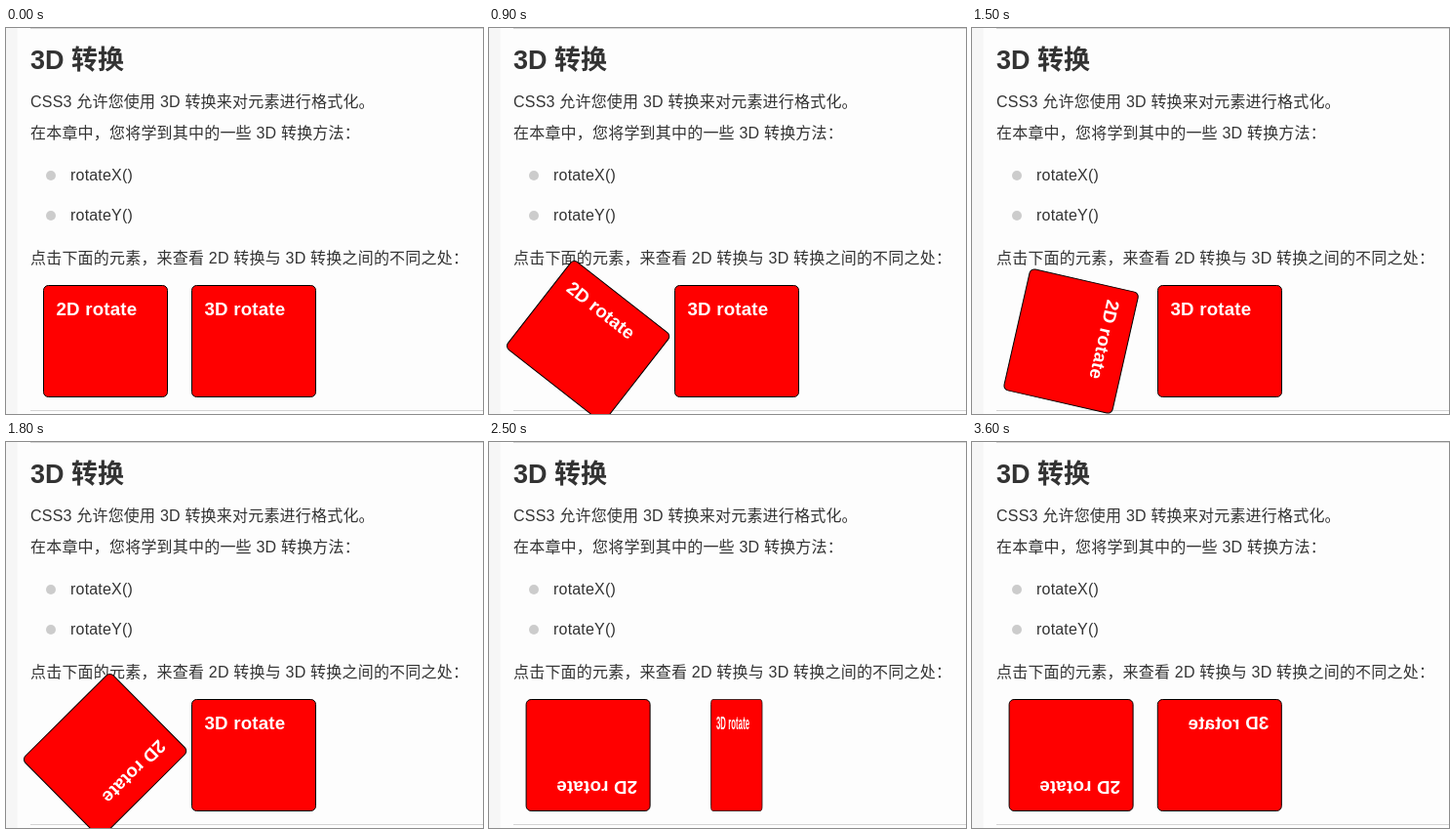
These frames come from a looping animation (489 by 395 pixels, 4.5 s). An HTML page:

```html
<!DOCTYPE html>
<html lang="zh-CN">
<head>
<meta charset="utf-8">
<title>3D 转换</title>
<style>
  html, body { margin: 0; width: 100%; height: 100%; overflow: hidden; background: #fdfdfd; }
  svg { display: block; }
  text {
    font: 16px "Liberation Sans", Arial, "Noto Sans CJK SC", "Noto Sans CJK", sans-serif;
    letter-spacing: .2px;
    fill: #333;
  }
  .title { font-size: 27px; font-weight: bold; letter-spacing: 0; }
  .box rect { fill: #f00; stroke: #000; }
  .box text { font-size: 18.72px; font-weight: bold; fill: #fff; }
</style>
</head>
<body>
<svg width="489" height="395" viewBox="0 0 489 395">
  <rect width="489" height="395" fill="#fdfdfd"/>
  <rect width="11.5" height="395" fill="#f6f6f6"/>
  <path d="M25 .5H489M25 391.5H489" stroke="#d4d4d4"/>
  <text class="title" x="25" y="42">3D 转换</text>
  <text x="25" y="81">CSS3 允许您使用 3D 转换来对元素进行格式化。</text>
  <text x="25" y="113">在本章中，您将学到其中的一些 3D 转换方法：</text>
  <g fill="#ccc"><circle cx="46" cy="151" r="5"/><circle cx="46" cy="192" r="5"/></g>
  <text x="66" y="156">rotateX()</text>
  <text x="66" y="197">rotateY()</text>
  <text x="25" y="241">点击下面的元素，来查看 2D 转换与 3D 转换之间的不同之处：</text>
  <!-- Boxes are drawn around their own centre -->
  <g class="box" id="flat">
    <rect x="-63.5" y="-57" width="127" height="114" rx="5"/>
    <text x="-50.5" y="-26.5">2D rotate</text>
  </g>
  <g class="box" id="deep">
    <rect x="-63.5" y="-57" width="127" height="114" rx="5"/>
    <text x="-50.5" y="-26.5">3D rotate</text>
  </g>
</svg>
<script>
  const LOOP = 4500, STEP = 100, CY = 320.5;
  const flat = document.getElementById('flat');
  const deep = document.getElementById('deep');

  // Degrees turned at time t: constant speed, stopping at a half turn
  const turn = (t, start, speed) => Math.min(180, Math.max(0, (t - start) * speed));

  // A resting box sits on whole pixels; a turning one keeps its exact centre
  function place(box, cx, angle, transform) {
    const x = angle > 0 ? cx : Math.round(cx);
    box.setAttribute('transform', `translate(${x} ${CY}) ${transform}`);
  }

  function draw(ms) {
    const t = Math.floor((ms % LOOP) / STEP) * STEP;
    const a = turn(t, 548, 0.108);
    const b = turn(t, 1909, 0.111);
    place(flat, 101.6, a, `rotate(${a})`);
    place(deep, 253.8, b, `scale(${Math.cos(b * Math.PI / 180)} 1)`);
  }

  const begin = performance.now();
  function tick() {
    draw(performance.now() - begin);
    requestAnimationFrame(tick);
  }
  tick();
</script>
</body>
</html>
```
